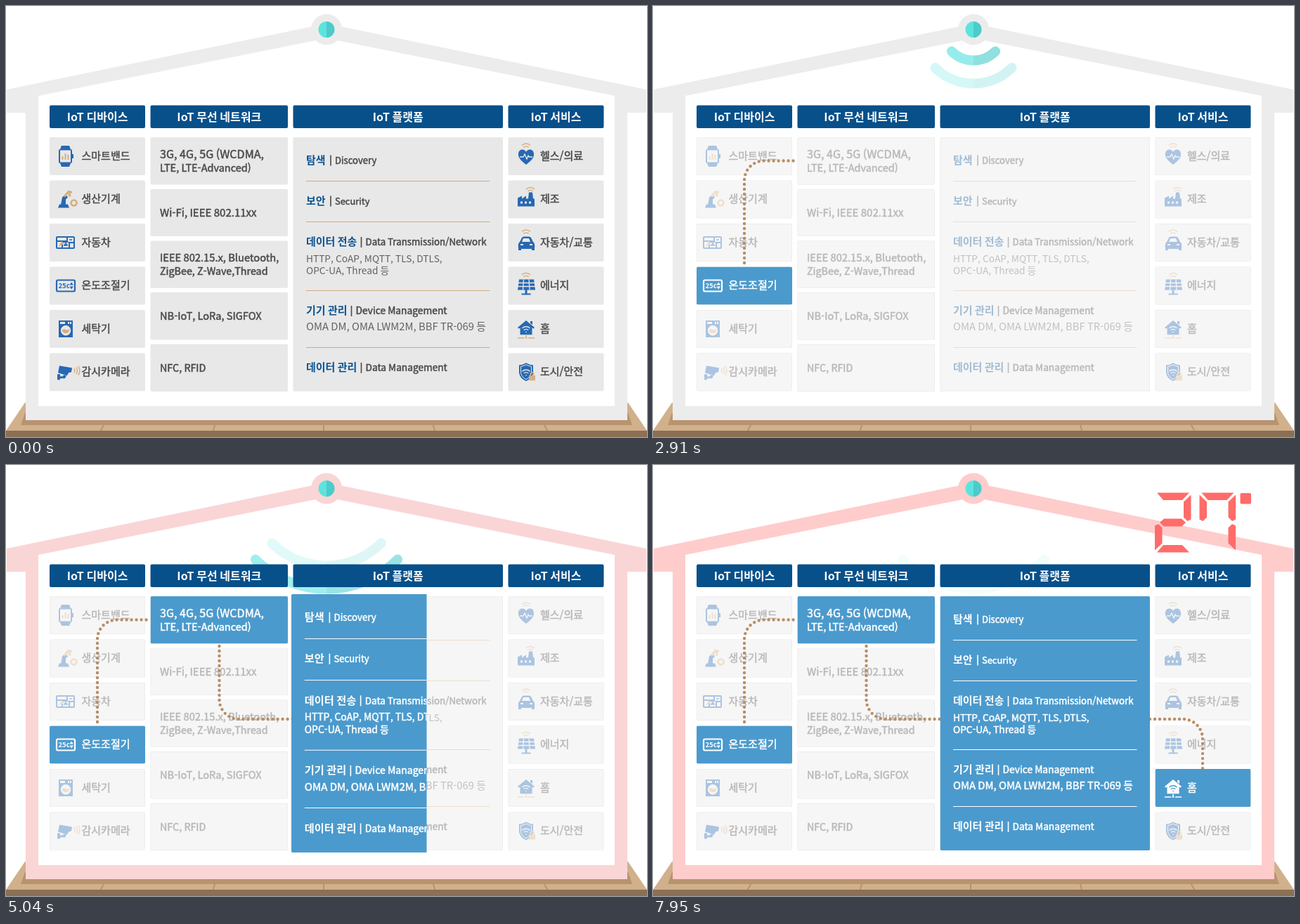
Animation, 912 px wide and 614 px high, one loop 8000 ms. Source, as an HTML page with a canvas:

```html
<!DOCTYPE html>
<html lang="ko">
<head>
<meta charset="utf-8">
<style>
html, body { margin: 0; width: 100%; height: 100%; overflow: hidden; background: #fff; }
canvas { display: block; }
</style>
</head>
<body>
<canvas id="stage" width="912" height="614"></canvas>
<script>
const LOOP = 8000;
const ctx = document.getElementById('stage').getContext('2d');
const FONT = '"Noto Sans CJK KR", "Noto Sans CJK", "Noto Sans KR", sans-serif';

const NORMAL = { blue: '#2868b2', tan: '#d6ae7f', back: '#e8e8e8', text: '#4a4a4a', detail: '#626262', head: '#0c5391', line: '#d0ab80', detailWeight: 400 };
const ACTIVE = { blue: '#fff', tan: '#fff', back: '#4b9acd', text: '#fff', detail: '#fff', head: '#fff', line: '#fff', detailWeight: 500 };

const clamp = v => Math.max(0, Math.min(1, v));
const progress = (t, start, duration) => clamp((t - start) / duration);
const mix = (a, b, p) => `rgb(${a.map((v, i) => Math.round(v + (b[i] - v) * p))})`;

function fill(color, path) {
  ctx.fillStyle = color;
  ctx.fill(new Path2D(path));
}
function stroke(color, width, path) {
  ctx.strokeStyle = color;
  ctx.lineWidth = width;
  ctx.stroke(new Path2D(path));
}
function box(color, x, y, w, h, r = 2) {
  ctx.fillStyle = color;
  ctx.beginPath();
  ctx.roundRect(x, y, w, h, r);
  ctx.fill();
}
// Weight 500 is the regular face thickened by a fine outline
function text(str, x, y, size, weight, color, align = 'left') {
  ctx.font = `${weight === 700 ? 700 : 400} ${size}px ${FONT}`;
  ctx.fillStyle = ctx.strokeStyle = color;
  ctx.textAlign = align;
  ctx.fillText(str, x, y);
  if (weight !== 500) return;
  ctx.lineWidth = .5;
  ctx.lineJoin = 'round';
  ctx.strokeText(str, x, y);
  ctx.lineJoin = 'miter';
}

// Icons: [colour key, path, stroke width (filled if absent)], centred on 0,0
const WIFI = 'M-6-15.5a8.5 8.5 0 0 1 12 0M-3.6-12.6a5.2 5.2 0 0 1 7.2 0';
const INNER_WIFI = 'M-5.5-1a8 8 0 0 1 11 0M-3.2 1.8a4.6 4.6 0 0 1 6.4 0M-.7 4.4h1.4';
const ICONS = {
  watch: [['blue', 'M-6-15h11l2 5h-15zM-6 15h11l2-5h-15zM9-3h2v6h-2z'], ['blue', 'M-8-10h15q2 0 2 2v16q0 2-2 2h-15q-2 0-2-2v-16q0-2 2-2z'],
    ['back', 'M-8-8.500h15v17h-15z'], ['tan', 'M-4.500 5v-5M-.5 5v-9M3.500 5v-7', 2]],
  robot: [['blue', 'M-11 12l2-5h12l2 5zM-7 8l2-11 5-4 3 4-3 3v8z'], ['tan', 'M-2-4l6-7 5 1M5-9l1 5', 3.2], ['tan', 'M11.5 1a4 4 0 1 0 .1 0z', 2.6]],
  navi: [['blue', 'M-12-9h23q2 0 2 2v14q0 2-2 2h-23q-2 0-2-2v-14q0-2 2-2z'], ['back', 'M-12-7h13v4h-13zM3-7h8v6h-8zM-12-1h6v8h-6zM-4 0h8v7h-8zM6 1h5v6h-5z'],
    ['tan', 'M-10 6l4-8 4 3'], ['blue', 'M5-4h4M-2 4l2-3 2 3z', 1.6]],
  thermostat: [['blue', 'M-11-8h22q2 0 2 2v12q0 2-2 2h-22q-2 0-2-2v-12q0-2 2-2z', 2.2], ['blue', 'M5.5-1l2.7-4 2.7 4zM5.5 1l2.7 4 2.7-4z']],
  washer: [['blue', 'M-10-12h20v24h-20z'], ['back', 'M-8-10h7v3h-7zM3-10h2v3h-2zM6-10h2v3h-2zM0-5a7.2 7.2 0 1 0 .1 0z'], ['tan', 'M-5.5 2q3-3 5.5-1t5.5-1a5.6 5.6 0 0 1-11 2z']],
  camera: [['blue', 'M-9-9l18 3-1 6-4 1-2 4-13-4zM-3 4l4 1-2 4h-7v2h-4v-8h4v3h4z'], ['tan', 'M12-5q2 3 0 6M15-7q3 5 0 10M18-8.500q4 6.500 0 13', 1.4]],
  heart: [['tan', WIFI, 1.6], ['blue', 'M0 12C-5 8-12 3-11-4c1-7 9-7 11-2 2-5 10-5 11 2 1 7-6 12-11 16z'], ['back', 'M-9 1h5l2-4 3 7 2-5 1 2h5', 1.3]],
  factory: [['blue', 'M-12 10v-12l6-3v4l6-4v4h3l1-9h5l1 9h2v11z'], ['back', 'M-8 3h3v3h-3zM-2 3h3v3h-3zM4 3h3v3h-3z']],
  car: [['tan', WIFI, 1.6], ['blue', 'M-11 8q-1-7 2-9l3-6q1-1.500 3-1.500h7q2 0 3 1.500l3 6q3 2 2 9v3h-4v-2h-15v2h-4z'], ['back', 'M-6-1l2-5h8l2 5zM-8 2h4v2h-4zM5 2h4v2h-4z']],
  solar: [['tan', WIFI, 1.6], ['blue', 'M-10-9h21l2 15h-25zM-1.500 5h3v6h5v2h-13v-2h5z'], ['back', 'M-11-4h23M-12 1h25M-3.500-9l-1 15M4-9l1 15', 1.3]],
  home: [['blue', 'M0-12l12 10-1.500 1.800-2-1.500v10h-17v-10l-2 1.500-1.500-1.800zM6-11h3v5l-3-2z'], ['back', INNER_WIFI, 1.5], ['tan', 'M0 9v4M-12 13h9M3 13h9M-1.500 13h3', 1.6]],
  shield: [['blue', 'M0-13q5 3 10 3v11q-1 8-10 12-9-4-10-12v-11q5 0 10-3z'], ['back', 'M0-10.500q4 2 7.500 2.500v9q-1 6-7.500 9.500-6.500-3.500-7.500-9.500v-9q4-.5 7.500-2.500z', 1],
    ['back', INNER_WIFI, 1.5], ['tan', 'M4 5h9v7h-9z'], ['tan', 'M6 5v-2a2.500 2.500 0 0 1 5 0v2', 1.4]]
};
function drawIcon(name, x, y, theme) {
  ctx.save();
  ctx.translate(x, y);
  for (const [key, path, width] of ICONS[name]) width ? stroke(theme[key], width, path) : fill(theme[key], path);
  if (name === 'thermostat') text('25c', -10.5, 3.5, 9.5, 700, theme.blue);
  if (name === 'factory') {
    ctx.translate(6, 1);
    stroke(theme.tan, 1.6, WIFI);
  }
  ctx.restore();
}

// Every cell has a frame and a draw(theme) for its contents
const cells = [];
function iconColumn(x, rows) {
  rows.forEach(([icon, label], i) => {
    const y = 187 + i * 61.5, mid = y + 27;
    cells.push({ x, y, w: 136, h: 54, draw(theme) {
      drawIcon(icon, x + 23 + (x > 500 ? 2.5 : 0), mid, theme);
      text(label, x + 45.5, mid + 4.5, 15, 500, theme.text);
    } });
  });
}
iconColumn(62, [['watch', '스마트밴드'], ['robot', '생산기계'], ['navi', '자동차'], ['thermostat', '온도조절기'], ['washer', '세탁기'], ['camera', '감시카메라']]);
iconColumn(714.5, [['heart', '헬스/의료'], ['factory', '제조'], ['car', '자동차/교통'], ['solar', '에너지'], ['home', '홈'], ['shield', '도시/안전']]);

[
  [['3G, 4G, 5G (WCDMA,', 16.1], ['LTE, LTE-Advanced)', 14.5]],
  [['Wi-Fi, IEEE 802.11xx', 15]],
  [['IEEE 802.15.x, Bluetooth,', 14.7], ['ZigBee, Z-Wave,Thread', 14.3]],
  [['NB-IoT, LoRa, SIGFOX', 14.6]],
  [['NFC, RFID', 14.3]]
].forEach((lines, i) => {
  const y = 187 + i * 73.7;
  cells.push({ x: 205.5, y, w: 195.5, h: 67.4, draw(theme) {
    lines.forEach(([str, size], k) => text(str, 219, y + 39 + (lines.length > 1 ? k * 19 - 9.5 : 0), size, 500, theme.text));
  } });
});

const PLATFORM = [
  ['탐색', 462, 'Discovery', 13.1, 224.5],
  ['보안', 462, 'Security', 12.9, 282.5],
  ['데이터 전송', 505.5, 'Data Transmission/Network', 13.3, 341],
  ['기기 관리', 491.5, 'Device Management', 13.8, 439],
  ['데이터 관리', 505.5, 'Data Management', 13.7, 520]
];
const DETAILS = [['HTTP, CoAP, MQTT, TLS, DTLS,', 13.7, 364.5], ['OPC-UA, Thread 등', 13.7, 382], ['OMA DM, OMA LWM2M, BBF TR-069 등', 14.8, 462]];
cells.push({ x: 408.5, y: 187, w: 298.5, h: 362, draw(theme) {
  for (const [head, bar, name, size, y] of PLATFORM) {
    text(head, 427, y, 15, 700, theme.head);
    box(theme.text, bar - .8, y - 12, 1.6, 15, 0);
    text(name, bar + 6, y, size, 500, theme.text);
  }
  for (const [str, size, y] of DETAILS) text(str, 427, y, size, theme.detailWeight, theme.detail);
  for (const y of [249, 307, 405, 486]) box(theme.line, 427, y, 261.5, 1.1, 0);
} });

const HEADERS = [['IoT 디바이스', 62, 136], ['IoT 무선 네트워크', 205.5, 195.5], ['IoT 플랫폼', 408.5, 298.5], ['IoT 서비스', 714.5, 136]];

// Highlighted cells in story order: index, start time, enlarged scale
const HIGHLIGHTS = [[3, 1367, 1.045], [12, 3330, 1.043], [17, 4718, 1.017], [10, 6300, 1.045]];
// Dotted links: start time, length, path
const LINKS = [
  [2280, 209, 'M130 366V248A28 28 0 0 1 158 220.500H205'],
  [4240, 199, 'M303.5 258V334A28 28 0 0 0 331.5 362H410'],
  [5620, 138, 'M707 362H754A28 28 0 0 1 782 390V436']
];

function drawGround() {
  fill('#d1b08c', 'M27 565H885L912 605H0z');
  fill('#b8936f', 'M27 580H885L891 597H21z');
  for (const x of [143, 299, 452, 606, 762]) stroke('#b8936f', 2, `M${x} 590L${x + (x - 452) * .027} 605`);
  box('#8b7056', 0, 605, 912, 9, 0);
}

function drawHouse(t) {
  const color = mix([236, 236, 236], [255, 204, 204], progress(t, 3950, 1510));
  fill(color, 'M1 119L456 25 911 119V152H884V590H28V152H1z');
  fill('#fff', 'M46 128L456 46 866 128V570H46z');
  fill(color, 'M456 11.500a22 22 0 1 0 .1 0z');
  fill('#5de3de', 'M456 22a11.500 11.500 0 0 0 0 23z');
  fill('#4bcbca', 'M456 22a11.500 11.500 0 0 1 0 23z');
}

function drawSignal(t) {
  if (t < 30) return;
  const phase = (t + 54) % 1350;
  ctx.lineWidth = 14;
  ctx.lineCap = 'round';
  for (let i = 0; i < 4; i++) {
    ctx.globalAlpha = clamp(1 - Math.abs(phase - 400 - 160 * i) / 400);
    for (const [x, color] of [[256, '#5fe3e0'], [456, '#55d0cf']]) {
      ctx.save();
      ctx.beginPath();
      ctx.rect(x, 50, 200, 150);
      ctx.clip();
      ctx.beginPath();
      ctx.arc(456, 33.5, 44 + 33 * i, Math.PI / 4, Math.PI * 3 / 4);
      ctx.strokeStyle = color;
      ctx.stroke();
      ctx.restore();
    }
  }
  ctx.globalAlpha = 1;
  ctx.lineCap = 'butt';
}

function drawTable(t) {
  for (const [label, x, w] of HEADERS) {
    box('#08508a', x, 141.5, w, 32.5);
    text(label, x + w / 2, 163.5, 16, 700, '#fff', 'center');
  }
  const veil = `rgba(255,255,255,${.61 * progress(t, 900, 750)})`;
  for (const c of cells) {
    box(NORMAL.back, c.x, c.y, c.w, c.h);
    c.draw(NORMAL);
    box(veil, c.x + .6, c.y + .6, c.w - 1.2, c.h - 1.2);
  }
}

function drawLinks(t) {
  const gap = 7;
  ctx.lineCap = 'round';
  for (const [start, length, path] of LINKS) {
    const dots = Math.ceil(length * progress(t, start, 300) / gap);
    if (!dots) continue;
    ctx.setLineDash([...Array(dots - 1).fill([0, gap]).flat(), 0, 999]);
    stroke('#b88e68', 4.4, path);
  }
  ctx.setLineDash([]);
  ctx.lineCap = 'butt';
}

function drawHighlights(t) {
  for (const [index, start, scale] of HIGHLIGHTS) {
    if (t < start) continue;
    const c = cells[index], cx = c.x + c.w / 2, cy = c.y + c.h / 2;
    const settle = progress(t, start + 1010, 110);
    const zoom = scale + (1 - scale) * settle;
    const shown = .985 * progress(t, start, 500) + .015 * settle;
    ctx.save();
    ctx.translate(cx, cy);
    ctx.scale(zoom, zoom);
    ctx.translate(-cx, -cy);
    ctx.beginPath();
    ctx.rect(c.x, c.y, c.w * shown, c.h);
    ctx.clip();
    box(ACTIVE.back, c.x, c.y, c.w, c.h);
    c.draw(ACTIVE);
    ctx.restore();
  }
}

// Seven-segment shapes in a 51 x 85 digit; the others are mirrored
const BAR = [[3, 0], [49, 0], [39, 10.5], [12, 10.5]];
const SIDE = [[0, 3], [10.5, 13], [10.5, 35], [5, 40.5], [0, 38]];
const MIDDLE = [[7, 42.5], [13, 37], [38, 37], [44, 42.5], [38, 48], [13, 48]];
const SEGMENTS = {
  a: [BAR, 0, 0], d: [BAR, 0, 1], g: [MIDDLE, 0, 0],
  f: [SIDE, 0, 0], b: [SIDE, 1, 0], e: [SIDE, 0, 1], c: [SIDE, 1, 1]
};
const DIGITS = { 2: 'abged', 3: 'abgcd', 4: 'fgbc', 5: 'afgcd', 6: 'afgecd', 7: 'fabc' };
function drawDigit(digit, x, y) {
  for (const s of DIGITS[digit]) {
    const [points, flipX, flipY] = SEGMENTS[s];
    fill('#ff6c69', 'M' + points.map(([px, py]) => [x + (flipX ? 51.5 - px : px), y + (flipY ? 85 - py : py)]).join('L') + 'z');
  }
}
function drawTemperature(t) {
  if (t < 6420) return;
  drawDigit(2, 714, 39.5);
  drawDigit(Math.min(7, 2 + Math.floor((t - 6420) / 240)), 777.5, 39.5);
  box('#ff6c69', 835.5, 40, 15.5, 15.5);
}

function render(now) {
  const t = now % LOOP;
  ctx.fillStyle = '#fff';
  ctx.fillRect(0, 0, 912, 614);
  drawGround();
  drawHouse(t);
  drawSignal(t);
  drawTable(t);
  drawLinks(t);
  drawHighlights(t);
  drawTemperature(t);
}

let begin;
function tick(now) {
  begin ??= now;
  render(now - begin);
  requestAnimationFrame(tick);
}
requestAnimationFrame(tick);
</script>
</body>
</html>
```
